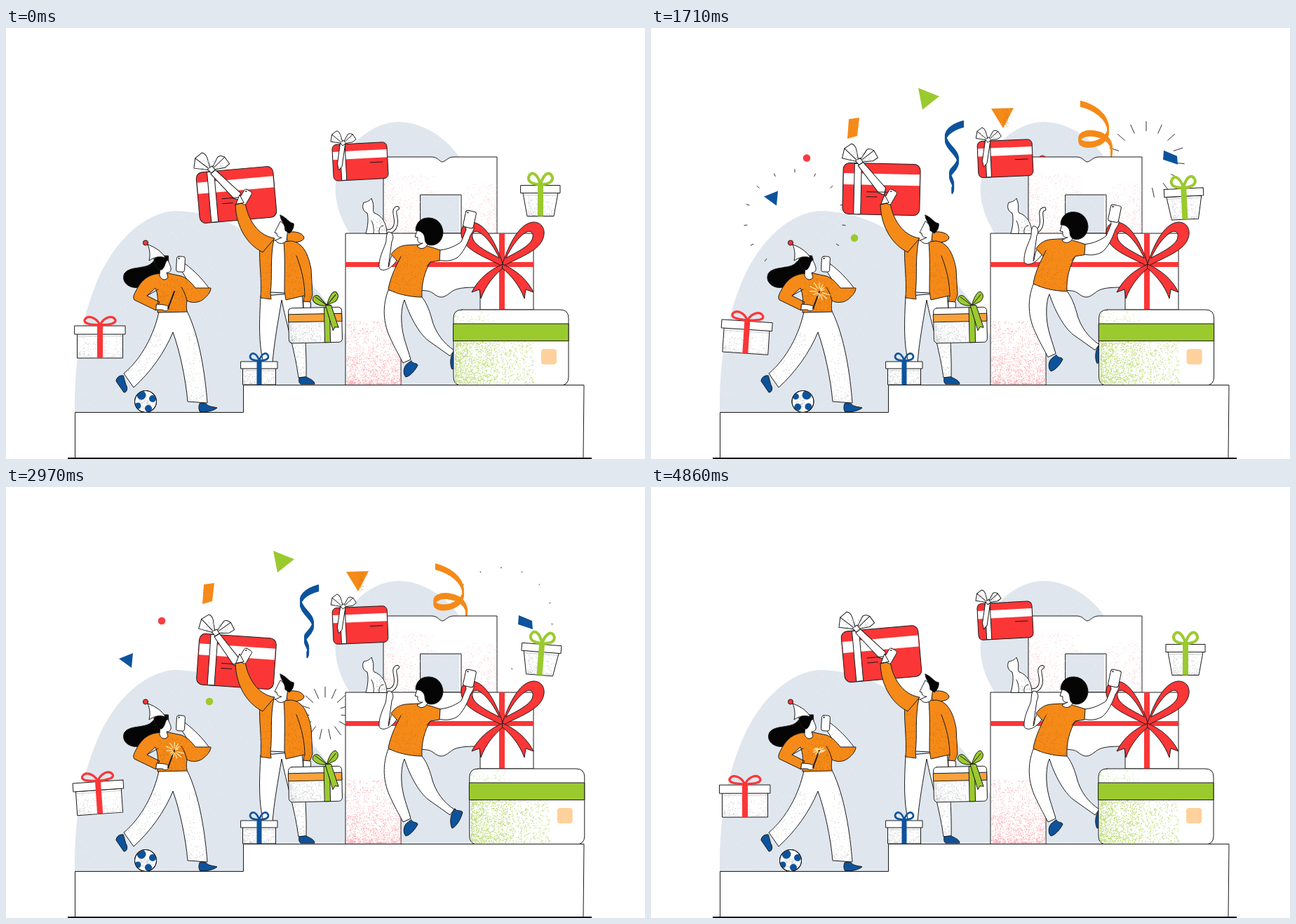
These frames come from a looping animation (911x615 px, 4890 ms). An HTML page:

```html
<!DOCTYPE html>
<html lang="en">
<head>
<meta charset="utf-8">
<title>Gift party</title>
<style>
html, body { margin: 0; width: 100%; height: 100%; overflow: hidden; background: #fff; }
svg { display: block; width: 911px; height: 615px; }
.l { stroke: #1a1a1a; stroke-width: 1; stroke-linejoin: round; stroke-linecap: round; }
.l * { vector-effect: non-scaling-stroke; }
</style>
</head>
<body>
<svg id="stage" viewBox="0 0 911 615"></svg>
<script>
const LOOP = 4890;
const ORANGE = '#f58a18', RED = '#fb3637', BLUE = '#0d539c', GREEN = '#9bca2f', SKY = '#dfe6ee';
const RUST = '#d5720f', GREY = '#bcbfc2';
const TIMES = [0, 540, 1260, 2100, 2970, 4080, LOOP];

let seed = 7;
const rnd = () => (seed = (seed * 16807) % 2147483647) / 2147483647;

// Specks thin out away from (x, y); clip names a clipPath.
function grain(color, n, x, y, w, h, px = 1, py = 1, clip = '', size = 0.9) {
  let d = '';
  for (let i = 0; i < n; i++) {
    const gx = x + w * rnd() ** px, gy = y + h * rnd() ** py;
    d += `M${gx.toFixed(1)} ${gy.toFixed(1)}h${size}`;
  }
  const cp = clip && ` clip-path="url(#${clip})"`;
  return `<g${cp}><path d="${d}" fill="none" stroke="${color}" style="stroke-width:${size};stroke-linecap:butt"/></g>`;
}

const path = (d, fill = 'none', extra = '') => `<path d="${d}" fill="${fill}" ${extra}/>`;
const rect = (x, y, w, h, fill, r = 0, extra = '') =>
  `<rect x="${x}" y="${y}" width="${w}" height="${h}" rx="${r}" fill="${fill}" ${extra}/>`;
const clipDef = (id, d) => `<clipPath id="${id}"><path d="${d}"/></clipPath>`;
const group = (id, body, cls = 'l') => `<g id="${id}" class="${cls}">${body}</g>`;

// A flat band: one line repeated straight down, like a broad pen.
function streamer(d, color, h) {
  let s = '';
  for (let y = 0; y <= h; y++) s += path(d, 'none', `stroke="${color}" stroke-width="2" transform="translate(0 ${y})"`);
  return s;
}

// Origin: middle of the lid's top edge.
function gift(o) {
  const { w, lid, top, bottom, h, rib, bx, by, color } = o;
  const y = lid + h;
  const bow = s => `M0 -1C${-.25 * bx * s} ${-by * .9} ${-bx * .8 * s} ${-by * 1.15} ${-bx * s} ${-by * .6}` +
    `C${-bx * 1.05 * s} ${-by * .15} ${-bx * .5 * s} -2 0 -1`;
  return path(`M${-top / 2} ${lid}L${-bottom / 2} ${y}H${bottom / 2}L${top / 2} ${lid}Z`, '#fff') +
    grain('#c4c7ca', 190, -bottom / 2 + 1, y - 1, bottom - 2, -h + 2, 1.5, 1.8) +
    path(`M${-top / 2 + 1} ${lid + 3}H${top / 2 - 1}`, 'none', 'stroke="#9da1a6" stroke-opacity=".5"') +
    rect(-w / 2, 0, w, lid, '#fff') +
    rect(-rib / 2, 0, rib, y, color, 0, 'stroke="none"') +
    path(bow(1) + bow(-1), 'none', `stroke="${color}" style="stroke-width:${o.sw}"`);
}

function redCard(tail, marks) {
  return rect(-55, -36.5, 110, 73, RED, 9) +
    rect(-54, -22, 108, 16, '#fff', 0, 'stroke="none"') +
    path('M-39 -36V36H-29V-36Z', '#fff') + path(tail, '#fff') + path(marks) +
    path('M-33 -38L-57 -43L-54 -57L-44 -64Q-39 -63 -37 -56Z', '#fff') +
    path('M-33 -38L-54 -57') +
    path('M-33 -38L-22 -56Q-18 -59 -12 -55L-6 -45L-13 -40Z', '#fff') +
    path('M-33 -38L-12 -55') +
    path('M-38 -40L-31 -44L-27 -38L-33 -34Z', '#fff') +
    grain(GREY, 35, -36, -40, -16, -14, 1.5, 1.3) + grain(GREY, 35, -29, -40, 13, -12, 1.5, 1.5);
}

const SHAPES = {
  sky1: 'M98 549C97 480 106 420 128 366C154 300 202 262 242 261C298 263 340 283 372 318C420 340 462 388 484 440V510H338V549Z',
  sky2: 'M490 293C474 268 466 238 471 216C482 168 520 134 561 134C595 135 627 156 646 184V293ZM563 368H676V509H563Z',
  block: 'M538 293V184H607C616 184 618 191 622 191C626 191 630 184 638 184H700V293ZM591 293H649V238H591Z',
  base: 'M484 509V293H752V402H676V370C652 370 641 371 633 378C623 386 618 386 608 378C602 374 595 374 563 374V509Z',
  sweater: 'M214 351C202 353 194 360 188 370C183 379 180 384 183 388L214 403L219 391L201 382L213 371C217 380 217 392 216 406L258 405C257 398 257 395 258 389C265 393 274 392 280 388C288 382 292 376 292 371L270 371C264 363 258 357 250 354L231 350Z',
  coat: 'M368 303L382 301C376 330 380 355 377 378L378 387L363 385C365 355 360 332 362 312ZM396 305L406 304C420 305 430 317 435 344L437 381L433 392L424 390L425 382L399 388L397 376C397 350 398 325 396 305Z',
  shirt: 'M570 310C560 311 554 316 549 323L559 334C553 346 547 360 545 373C558 380 577 384 593 384C592 365 597 347 605 334L618 332L619 317C605 312 596 310 589 309Z',
  card: 'M650 402H790Q802 402 802 414V498Q802 510 790 510H650Q638 510 638 498V414Q638 402 650 402Z',
  leg: 'M393 388C399 420 412 460 417 499L428 498C429 465 425 415 422 378Z',
  pants: 'M218 405C211 438 193 472 168 493L182 513C207 490 226 463 238 434C248 462 256 500 259 533L287 535C284 495 276 440 258 404Z',
};

// centre and start time
const BURSTS = [[205, 274, 420], [706, 188, 1260], [455, 323, 2850]];

// shape, offsets at the five middle key times, start of the drop
const CONFETTI = [
  [path('M381 90L411 102L387 121Z', GREEN), [-31, 0, -8, 1, 4], 4090],
  [path('M161 245L181 237L179 258Z', BLUE), [-39, 0, -8, 0, 3], 4100],
  [path('M485 119L517 118L502 147Z', ORANGE) + grain(RUST, 50, 501, 146, 8, -28, 1, 1, '', .8), [-16, 0, -7, 2, 4], 4110],
  [path('M282 132L297 130L294 156L280 160Z', ORANGE), [3, 0, -3, 7, 9], 3770],
  [path('M731 178L750 186L751 198L730 191Z', BLUE), [-5, 0, -6, 5, 6], 4100],
  ['<circle cx="222" cy="190" r="5.3" fill="#f93c43"/>', [-30, 0, -8, 1, 4], 4090],
  ['<circle cx="558" cy="191" r="5.3" fill="#f93c43"/>', [-8, 0, -8, 1, 4], 4100],
  [`<circle cx="290" cy="303" r="5.3" fill="${GREEN}"/>`, [-15, 0, -6, 3, 5], 4100],
  [streamer('M446 136C427 141 415 152 422 163C427 173 441 181 437 192C433 203 423 204 427 213C431 221 433 226 429 232', BLUE, 8), [-10, 0, -6, 4, 6], 4095],
  [streamer('M612 109C632 114 651 127 652 146C652 164 624 173 612 164C606 155 620 149 634 152C650 155 660 166 656 182', ORANGE, 7), [-39, 0, -8, 1, 3], 4100],
];

const bow = s => {
  const X = x => 708 + s * x;
  return path(`M708 336C${X(12)} 300 ${X(27)} 278 ${X(44)} 277C${X(58)} 277 ${X(63)} 291 ${X(56)} 304C${X(48)} 319 ${X(25)} 327 708 340Z` +
    `M${X(5)} 328C${X(20)} 320 ${X(37)} 312 ${X(42)} 302C${X(46)} 291 ${X(39)} 287 ${X(31)} 293C${X(20)} 301 ${X(11)} 315 ${X(5)} 328Z`, RED, 'fill-rule="evenodd"') +
    path(`M708 337C${X(18)} 345 ${X(34)} 357 ${X(44)} 377L${X(33)} 373L${X(31)} 386C${X(24)} 367 ${X(12)} 353 708 343Z`, RED);
};

const phone = (x, y, w, h, a) =>
  rect(-w / 2, -h / 2, w, h, '#fff', 3, `transform="translate(${x} ${y}) rotate(${a})"`) +
  `<circle r=".6" transform="translate(${x} ${y}) rotate(${a}) translate(${-w / 2 + 3} ${-h / 2 + 3})"/>`;

const man =
  path('M363 383C361 420 360 450 367 478L380 478C382 450 388 418 393 388C399 420 412 460 417 499L428 498C429 465 425 415 422 378Z', '#fff') +
  grain(GREY, 130, 427, 496, -17, -90, 1, 1.4, 'leg') +
  path('M418 499C417 503 418 507 420 508H440C440 503 432 500 428 498Z', BLUE) +
  path('M377 303L398 303V378L377 377Z', '#fff') +
  path('M398 293C410 288 423 292 425 299C424 306 412 306 403 306Z', ORANGE) +
  path(SHAPES.coat, ORANGE) +
  grain(RUST, 260, 437, 390, -40, -70, 1, 1.6, 'coat') + grain(RUST, 90, 363, 386, 15, -80, 1, 1.6, 'coat') +
  path('M414 325C422 345 426 365 426 383') +
  path('M391 276C387 284 385 288 383 292L386 293C386 298 390 299 393 299L384 303C389 310 397 308 400 303L402 286Z', '#fff') +
  path('M391 267C391 275 398 279 398 289L404 293C408 290 411 284 410 279C403 278 400 270 391 267Z', '#050505') +
  path('', ORANGE, 'id="sleeve"') +
  group('manPhone', phone(341, 241, 12, 21, 30) + path('M328 251L333 238L339 249Z', '#fff'));

const bag =
  path('M424 390L434 391C436 398 433 406 427 407C423 403 424 397 424 390Z', '#fff') +
  `<g transform="rotate(-1.2 440 424)">` + rect(403, 399, 76, 50, '#fff', 5) + rect(403, 408, 76, 11, '#f9a23c') +
  grain(GREY, 260, 405, 447, 44, -26, 1.7, 1.5) +
  path('M454 399H462V449H454Z', GREEN) +
  path('M458 396C448 398 440 393 438 388C438 382 443 380 447 383ZM458 396C461 385 466 376 471 377C476 381 475 387 470 391Z', GREEN) +
  path('M458 396L442 384M458 396L471 381M456 396L464 396L474 428L469 427L466 432Z', GREEN) + '</g>';

const woman =
  group('hair', path('M231 325C220 324 213 330 206 337C196 344 176 340 169 350C163 362 176 373 190 370C206 368 209 356 218 352L232 347Z', '#050505')) +
  path(SHAPES.pants, '#fff') +
  grain(GREY, 190, 174, 502, 46, -70, 1.1, 1, 'pants') + grain(GREY, 120, 284, 532, -28, -100, 1, 1.4, 'pants') +
  path('M167 496C162 495 157 499 157 504L168 520C173 520 174 513 171 509Z', BLUE) +
  path('M276 536C274 541 275 546 277 548C285 548 295 547 301 542C295 540 289 541 285 536Z', BLUE) +
  path('M252 340C249 335 246 341 250 346L266 372L290 372C280 358 268 346 256 337C252 336 251 339 254 343Z', '#fff') +
  path(SHAPES.sweater, ORANGE) +
  grain(RUST, 280, 218, 405, 42, -48, 1, 1.5, 'sweater') + grain(RUST, 120, 291, 389, -70, -30, 1.3, 1, 'sweater') +
  path('M201 382L217 373M258 389C256 381 253 374 250 370') +
  path('M215 394C221 395 228 394 232 398C233 402 228 406 223 402L214 402Z', '#fff') +
  path('M231 400L240 376', 'none', 'style="stroke-width:2"') +
  path('M221 328L230 329C232 335 236 341 235 345C234 349 231 349 229 349L231 356C226 362 220 358 219 353Z', '#fff') +
  path('M211 330C220 321 232 325 231 331C226 333 228 340 222 345C215 346 212 339 211 330Z', '#050505') +
  path('M202 309C214 313 224 321 227 328C219 325 211 327 204 332C206 324 205 316 202 309Z', '#fff') +
  `<circle cx="199" cy="306.500" r="3.600" fill="${RED}"/>` + phone(249, 337, 12, 22, 3) +
  path('', 'none', 'id="spark" style="stroke:#fff0b5;stroke-width:1.2"');

const jumper =
  path('M553 319C545 332 548 337 545 341L550 305C554 298 551 291 545 291C541 296 543 302 541 308C537 318 531 330 532 342C536 349 548 345 557 332Z', '#fff') +
  path('M618 317C632 316 644 309 649 305L656 288C654 282 660 279 665 281C670 285 665 291 662 296C658 308 651 322 643 328C634 333 625 333 617 331Z', '#fff') +
  path('M545 374C537 395 536 420 550 447C556 460 562 470 566 478L577 473C572 455 565 440 564 420C563 403 566 392 568 388C575 410 588 435 602 446L633 468L639 460C624 450 612 435 607 415C603 400 598 390 593 384Z', '#fff') +
  path('M571 480C566 485 566 494 570 498C577 497 585 486 587 481C585 477 580 480 578 475Z', BLUE) +
  path('M636 466C633 471 633 482 636 487C642 485 649 473 651 464C648 460 643 464 640 459Z', BLUE) +
  path(SHAPES.shirt, ORANGE) +
  grain(RUST, 330, 548, 382, 48, -70, 1.4, 1.4, 'shirt') + path('M605 334L600 340M559 334L563 326') +
  path('M588 284L583 298L587 299C586 306 590 308 594 307L586 311C590 317 598 315 601 309L606 292Z', '#fff') +
  path('M603 271C591 270 584 279 584 289C590 289 596 292 597 299C597 306 600 310 606 310C616 310 623 302 623 291C622 279 614 271 603 271Z', '#050505') +
  phone(661, 273, 15, 24, 12);

const ball = '<circle r="15.500" fill="#fff"/>' + grain(GREY, 90, -10, 11, 20, -14, 1, 1) +
  [[-6, -9, 6.5], [10, -4, 5], [-11, 6, 4.5], [4, 10, 5]].map(([x, y, r]) =>
    `<circle cx="${x}" cy="${y}" r="${r}" fill="${BLUE}" stroke="none" clip-path="url(#ball)"/>`).join('') +
  '<circle r="15.500" fill="none"/>';

const catTail = 'M541 290C551 292 556 285 556 276C556 268 551 259 558 257';

document.getElementById('stage').innerHTML = '<defs>' +
  Object.entries(SHAPES).map(([k, d]) => clipDef(k, d)).join('') +
  clipDef('air', 'M0 68H911V615H0Z') + clipDef('ball', 'M-15 0A15 15 0 0 1 15 0A15 15 0 0 1 -15 0') +
  '</defs>' +
  path(SHAPES.sky1, SKY) + path(SHAPES.sky2, SKY) +
  grain('#f4f7fa', 500, 100, 262, 300, 285, 1, 1.2, 'sky1') + grain('#f4f7fa', 200, 470, 135, 180, 150, 1, 1, 'sky2') +
  '<path id="rays" fill="none" stroke="#333" stroke-width="1"/>' +
  '<g clip-path="url(#air)">' + CONFETTI.map((c, i) => `<g id="c${i}">${c[0]}</g>`).join('') + '</g>' +
  '<g class="l">' + path(SHAPES.block, '#fff', 'fill-rule="evenodd"') +
  grain('#fbc0c3', 420, 539, 292, 75, -85, 1.7, 1.5, 'block') + grain('#fbc0c3', 240, 699, 292, -50, -70, 1.3, 1.6, 'block') +
  path(SHAPES.base, '#fff') +
  grain('#f9a3a9', 1000, 485, 508, 78, -90, 1, 1.9, 'base', 1) + grain('#f9a3a9', 200, 485, 508, 78, -40, 1.2, 1.3, 'base', 1) +
  path('M484 334H752V341H484ZM703 293H711V402H703Z', RED, 'stroke="none"') + bow(-1) + bow(1) +
  group('tail', path(catTail, 'none', 'style="stroke-width:6"') + path(catTail, 'none', 'stroke="#fff" style="stroke-width:4"')) +
  path('M513 293C516 283 517 272 515 264C509 262 507 255 510 249C514 248 517 248 521 243L523 249C525 256 522 261 525 264C535 267 543 278 543 293Z', '#fff') +
  path('M524 293C525 285 523 279 521 275M532 293C531 285 535 282 538 282') + grain(GREY, 60, 541, 291, -18, -20, 1, 1.3) + '</g>' +
  group('card2', redCard('M-38 -38L-28 -38L-37 8L-44 15L-46 3Z', 'M20 3H45')) +
  group('jumper', jumper) +
  group('big', path(SHAPES.card, '#fff') + grain('#b9d970', 1100, 640, 508, 112, -62, 1.7, 1.1, 'card', 1.1) +
    grain('#b9d970', 350, 640, 508, 60, -62, 1.3, 1.1, 'card', 1.1) +
    grain('#b9d970', 60, 640, 420, 60, -17, 1.5, 1.2, 'card') +
    rect(638, 422, 164, 24.5, GREEN) + rect(763, 458, 22, 22, '#ffd19c', 4, 'stroke="none"')) +
  group('card1', redCard('M-34 -33L-27 -38L6 -2L4 8L-4 5Z', 'M-21 4H8M-21 11H-6')) +
  '<g class="l">' + path('M98.500 614V548.500H338.500V509.500H824L823 614', '#fff') + '</g>' +
  path('M88 614H835', 'none', 'stroke="#111" stroke-width="2"') +
  group('man', man) + group('bag', bag) +
  '<g class="l" transform="translate(361 476)">' +
  gift({ w: 52, lid: 10, top: 47, bottom: 47, h: 23, rib: 7, bx: 13, by: 13, sw: 2.6, color: BLUE }) + '</g>' +
  group('woman', woman) + group('ball1', ball) +
  group('gift1', gift({ w: 72, lid: 12, top: 65, bottom: 65, h: 34, rib: 8, bx: 22, by: 14, sw: 3.2, color: RED })) +
  group('gift2', gift({ w: 56, lid: 11, top: 50, bottom: 38, h: 33, rib: 8, bx: 17, by: 19, sw: 4, color: GREEN }));

// Smooth curve through the keys that stays flat at peaks.
function curve(t, times, v) {
  const n = times.length - 1;
  let i = 0;
  while (i < n - 1 && t > times[i + 1]) i++;
  const sec = k => (v[k + 1] - v[k]) / (times[k + 1] - times[k]);
  const slope = k => {
    const wrap = v[0] === v[n];
    if (!wrap && (k === 0 || k === n)) return 0;
    const a = sec(k === 0 ? n - 1 : k - 1), b = sec(k === n ? 0 : k);
    return a * b <= 0 ? 0 : 2 * a * b / (a + b);
  };
  const h = times[i + 1] - times[i];
  const u = Math.min(1, Math.max(0, (t - times[i]) / h));
  return v[i] * (1 + 2 * u) * (1 - u) ** 2 + slope(i) * h * u * (1 - u) ** 2 +
    v[i + 1] * u * u * (3 - 2 * u) + slope(i + 1) * h * u * u * (u - 1);
}

const $ = id => document.getElementById(id);
const move = (id, s) => $(id).setAttribute('transform', s);

function rays(t) {
  let d = '';
  for (const [x, y, start] of BURSTS) {
    const u = (t - start) / 1800;
    if (u <= 0 || u >= 1) continue;
    const far = 74 - 44 * (1 - u) ** 2.9, near = 72 - 57 * (1 - u) ** 2.1;
    for (let i = 0; i < 15; i++) {
      const a = i * 2 * Math.PI / 15 - Math.PI / 2;
      const c = Math.cos(a), s = Math.sin(a);
      d += `M${x + c * near} ${y + s * near}L${x + c * far} ${y + s * far}`;
    }
  }
  return d;
}

function spark(t) {
  const size = curve(t, [0, 180, 540, 2100, 2970, 4080, LOOP], [0, 0, 15, 17, 15, 11, 9]);
  const beat = Math.floor(t / 90);
  let d = '';
  if (size < 1) return d;
  for (let i = 0; i < 13; i++) {
    const k = Math.abs(Math.sin(i * 12.99 + beat * 4.7));
    const a = i * 2 * Math.PI / 13 + k * .4, r = size * (.4 + .6 * k);
    d += `M${240 + Math.cos(a) * r * .3} ${376 + Math.sin(a) * r * .3}L${240 + Math.cos(a) * r} ${376 + Math.sin(a) * r * .8}`;
  }
  return d;
}

function draw(t) {
  const at = (...v) => curve(t, TIMES, v);

  CONFETTI.forEach(([, v, drop], i) => {
    let y = curve(t, TIMES.slice(0, 6), [-320, ...v]);
    if (t > drop) y += 500 * ((t - drop) / 600) ** 2;
    move('c' + i, `translate(0 ${y})`);
    $('c' + i).setAttribute('opacity', t > 30 && t < drop + 580 ? 1 : 0);
  });
  $('rays').setAttribute('d', rays(t));
  $('spark').setAttribute('d', spark(t));

  move('card1', `translate(328.500 ${at(238, 235, 227, 235, 249, 242.5, 238)}) rotate(${at(-5, -2.5, .3, 2, 4, .4, -5)})`);
  move('card2', `translate(505 ${at(190.5, 189, 185.5, 187.5, 197, 196, 190.5)}) rotate(${at(-3, -2.6, -3, -2, -2.4, -2.8, -3)}) scale(.71)`);
  move('gift1', `translate(${at(134, 136.5, 139, 135, 131, 132, 134)} ${at(425, 421.5, 419, 418, 420.5, 427.5, 425)}) rotate(${at(0, 3, 6, .8, -4, -3.5, 0)})`);
  move('gift2', `translate(${at(762, 761, 758, 761, 764, 762.3, 762)} ${at(224.5, 226.5, 231, 227, 224.5, 224.5, 224.5)}) rotate(${at(0, -.6, -5, 0, 4.5, .8, 0)})`);

  move('jumper', `translate(0 ${at(0, -5, -11.5, -4.5, 0, 0, 0)})`);
  move('big', `translate(${curve(t, [0, 1640, 2100, 2900, 3270, 3810, LOOP], [0, 0, 12, 23, 19, 0, 0])} 0)`);
  move('tail', `rotate(${at(0, 2, 5, 3, 0, 0, 0)} 541 290)`);
  move('hair', `translate(${at(0, -1, -2, -1, 0, 0, 0)} 0)`);

  const roll = at(0, 26, 34, 3, 0, 0, 0);
  move('ball1', `translate(${199 + roll} 533) rotate(${roll / 15.5 * 57.3})`);

  const wave = curve(t, [0, 540, 1150, LOOP], [0, 1, 0, 0]);
  const x = wave * 8, y = wave * -13;
  $('sleeve').setAttribute('d', `M${327 + x} ${252 + y}L${341 + x} ${249 + y}` +
    `C${344 + x * .7} ${270 + y * .5} 357 296 383 300L366 320C${345 + x * .2} 310 ${328 + x} ${285 + y * .3} ${327 + x} ${252 + y}Z`);
  move('manPhone', `translate(${wave * 12} ${wave * -12})`);
  move('bag', `translate(${-wave} 0) rotate(${wave * 7} 430 398)`);
}

const begin = performance.now();
function tick() {
  draw((performance.now() - begin) % LOOP);
  requestAnimationFrame(tick);
}
draw(0);
requestAnimationFrame(tick);
</script>
</body>
</html>
```
